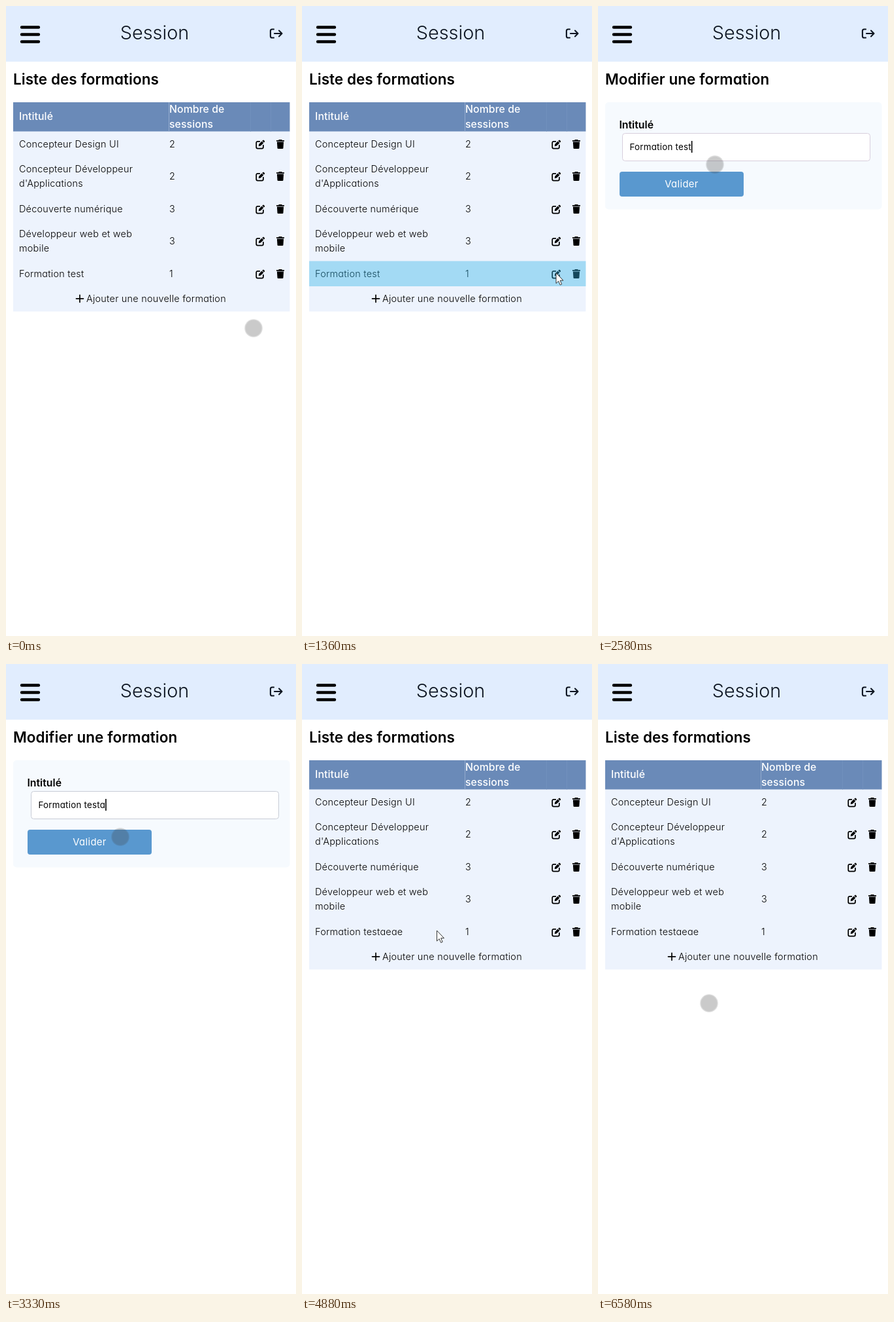
Animation of 444 by 962 pixels, one loop 6.61 s. Source, as an HTML page:

```html
<!DOCTYPE html>
<html lang="fr">
<head>
<meta charset="utf-8">
<title>Session</title>
<style>
  html, body { margin: 0; width: 100%; height: 100%; overflow: hidden; background: #fff; }
  svg { display: block; width: 100vw; height: 100vh; }
  text { font-family: Inter, "Open Sans", sans-serif; font-feature-settings: "cv11" 1; white-space: pre; }
  .brand { font-size: 28.8px; font-weight: 350; fill: #0c1420; }
  .title { font-size: 22.5px; font-weight: 600; letter-spacing: .002em; }
  .head { font-size: 15.8px; font-weight: 500; letter-spacing: .006em; fill: #fff; }
  .label { font-size: 15.8px; font-weight: 600; }
  .row { font-size: 14.4px; font-weight: 350; letter-spacing: .018em; }
  .field { font-size: 13.33px; font-weight: 400; letter-spacing: .018em; }
  .button { font-size: 14.8px; font-weight: 400; letter-spacing: .025em; fill: #fff; }
</style>
</head>
<body>
<svg viewBox="0 0 444 962" preserveAspectRatio="none">
  <defs>
    <g id="edit">
      <path d="M6 2.4H2.9A2 2 0 0 0 .9 4.4V11a2 2 0 0 0 2 2h6.7a2 2 0 0 0 2-2V8.2" fill="none" stroke="#000" stroke-width="1.75" stroke-linecap="round"/>
      <path d="M9.3 2 12 4.7 7.6 9.1 4.4 9.8 4.9 6.5ZM9.9 1.4 11 .4q.8-.6 1.6.1l.9.9q.7.8.1 1.6L12.6 4.1Z"/>
    </g>
    <path id="trash" d="M3.8 0h4.4l.6.9H12v1.8H0V.9h3.2ZM.9 3.5h10.2l-.6 9.2a1.3 1.3 0 0 1-1.3 1.3H2.8a1.3 1.3 0 0 1-1.3-1.3Z"/>
  </defs>

  <rect width="444" height="85" fill="#e1edfe"/>
  <path d="M24 32.5H50M24 43.5H50M24 54.5H50" stroke="#000" stroke-width="4.4" stroke-linecap="round"/>
  <text class="brand" x="227.5" y="51" text-anchor="middle">Session</text>
  <g fill="none" stroke="#0c1420" stroke-width="2.1" stroke-linecap="round" stroke-linejoin="round">
    <path d="M410 35.5h-2.5a2.6 2.6 0 0 0-2.6 2.6v7.8a2.6 2.6 0 0 0 2.6 2.6h2.5"/>
    <path d="M411 42h11M418 37.5l4.5 4.5-4.5 4.5"/>
  </g>

  <g id="list">
    <text class="title" x="11" y="120">Liste des formations</text>
    <rect x="11" y="191" width="423.5" height="275.5" fill="#edf3fd"/>
    <rect x="11" y="147" width="423.5" height="44.5" fill="#6a8ab8"/>
    <path d="M374.5 147v44.5M405.5 147v44.5" stroke="#7190bd"/>
    <path d="M249.5 147v44.5" stroke="#93abcd"/>
    <text class="head" x="20" y="174">Intitulé</text>
    <text class="head" x="250" y="163">Nombre de</text>
    <text class="head" x="250" y="186">sessions</text>
    <g id="rows"></g>
    <path d="M107.5 446.8h11M113 441.3v11" stroke="#000" stroke-width="1.7" stroke-linecap="round"/>
    <text class="row" x="123" y="452">Ajouter une nouvelle formation</text>
    <rect id="flash" x="11" y="389.5" width="423.5" height="38.5" fill="#33b5e5" fill-opacity=".4"/>
  </g>

  <g id="form">
    <text class="title" x="11" y="120">Modifier une formation</text>
    <rect x="11" y="147" width="423.5" height="163.5" rx="5" fill="#f6fafe"/>
    <text class="label" x="32.5" y="187">Intitulé</text>
    <g id="input">
      <rect id="border" x="38.5" y="194.5" width="379" height="42" rx="4" fill="#fff"/>
      <text id="typed" class="field" x="49.5" y="220"></text>
      <rect id="caret" y="206" width="1.6" height="18"/>
    </g>
    <rect x="33" y="253" width="190" height="38" rx="4" fill="#5998cf"/>
    <text class="button" x="128" y="277" text-anchor="middle">Valider</text>
  </g>

  <g id="cursor">
    <g id="touch">
      <circle r="13.8" fill-opacity=".18"/>
      <circle r="12.4" fill-opacity=".12"/>
    </g>
    <path id="arrow" d="M0 0V16L3.7 12.6 6.2 18.4 8.7 17.3 6.2 11.6H11Z" fill="#fff" stroke="#222" stroke-width=".9" stroke-linejoin="round"/>
  </g>
</svg>
<script>
const LOOP = 6610;
const OPEN = 1600;     // list -> form
const SAVED = 4480;    // form -> list
const NAME = 'Formation test', EXTRA = 'aeae';
const KEYS = [3050, 3350, 3650, 3950];
const FOCUS = 2300;

// time, x, y
const PATH = [
  [0, 379, 492], [60, 379, 491], [350, 386, 440], [620, 389, 406], [1360, 389, 407.5],
  [1600, 389, 407.5], [1800, 345, 350], [2000, 268, 262], [2200, 198, 222], [2340, 186, 218],
  [2580, 179, 242], [2800, 177, 257], [3330, 175, 264], [4060, 174, 265], [4150, 174, 271],
  [4420, 174, 271], [4520, 178, 292], [4700, 199, 378], [4880, 206.5, 407], [5060, 199, 414],
  [5350, 148, 420], [5610, 121, 434], [5730, 124, 462], [5950, 143, 500], [6250, 168, 517],
  [6400, 170, 518], [LOOP, 170, 518]
];
const ARROW = [[1360, 1900], [4420, 5000]];
const PRESS = [[1030, 1360], [2290, 2380], [4180, 4420]];

const $ = id => document.getElementById(id);
const show = (id, on) => $(id).setAttribute('visibility', on ? 'inherit' : 'hidden');
const within = (spans, t) => spans.some(([a, b]) => t >= a && t < b);

const ROWS = [
  [211, 2, 'Concepteur Design UI'],
  [260, 2, 'Concepteur Développeur', "d'Applications"],
  [310, 3, 'Découverte numérique'],
  [359, 3, 'Développeur web et web', 'mobile'],
  [409, 1, NAME]
];
$('rows').innerHTML = ROWS.map(([y, count, ...lines]) => {
  const top = y + 5 - (lines.length - 1) * 11;
  return lines.map((s, i) => `<text class="row" x="20" y="${top + i * 22}">${s}</text>`).join('') +
    `<text class="row" x="250" y="${y + 5}">${count}</text>` +
    `<use href="#edit" x="382.3" y="${y - 6.5}"/><use href="#trash" x="414" y="${y - 7}"/>`;
}).join('');
const lastName = [...document.querySelectorAll('#rows text')].at(-2);

// Monotone slope at a path point, so rests stay still and turns do not overshoot
function slope(i, k) {
  if (i <= 0 || i >= PATH.length - 1) return 0;
  const [a, b, c] = [PATH[i - 1], PATH[i], PATH[i + 1]];
  const d = (b[k] - a[k]) / (b[0] - a[0]), e = (c[k] - b[k]) / (c[0] - b[0]);
  return d * e <= 0 ? 0 : 2 * d * e / (d + e);
}

function position(t) {
  const i = Math.max(0, PATH.findIndex(p => p[0] > t) - 1);
  const a = PATH[i], b = PATH[i + 1], h = b[0] - a[0], u = (t - a[0]) / h;
  return [1, 2].map(k =>
    a[k] + (b[k] - a[k]) * u * u * (3 - 2 * u) +
    h * u * (1 - u) * (slope(i, k) * (1 - u) - slope(i + 1, k) * u));
}

function setText(el, s) {
  if (el.textContent !== s) el.textContent = s;
}

function draw(t) {
  const inForm = t >= OPEN && t < SAVED;
  show('form', inForm);
  show('list', !inForm);
  show('flash', t >= 1360 && t < OPEN);
  setText(lastName, t < SAVED ? NAME : NAME + EXTRA);

  if (inForm) {
    const count = KEYS.filter(k => t >= k).length;
    const since = t - (count ? KEYS[count - 1] : FOCUS);
    setText($('typed'), NAME + EXTRA.slice(0, count));
    $('caret').setAttribute('x', 49.5 + $('typed').getComputedTextLength());
    show('caret', since >= 0 && since % 1000 < 500);
    const early = t < 2700;
    $('input').setAttribute('transform', `translate(${early ? -1 : 0} 0)`);
    $('border').setAttribute('stroke', early ? '#d8cfdd' : '#c8ccd6');
  } else {
    show('caret', false);
  }

  const [x, y] = position(t), arrow = within(ARROW, t);
  $('cursor').setAttribute('transform', `translate(${x.toFixed(2)} ${y.toFixed(2)})`);
  show('arrow', arrow);
  show('touch', !arrow);
  $('touch').setAttribute('fill', within(PRESS, t) ? '#000' : '#404040');
}

const start = performance.now();
function tick() {
  draw((performance.now() - start) % LOOP);
  requestAnimationFrame(tick);
}
tick();
</script>
</body>
</html>
```
